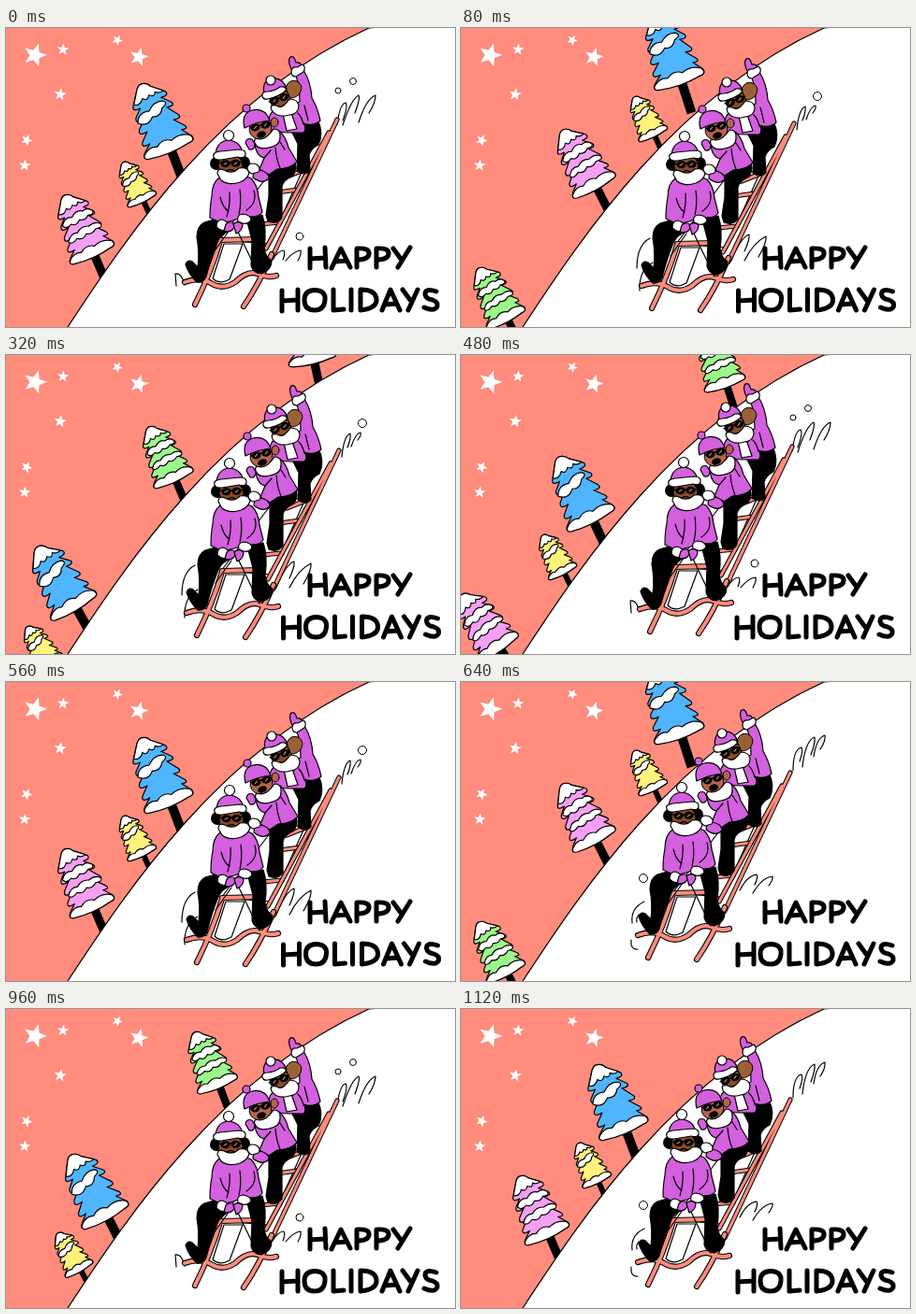
These frames come from a looping animation (480 by 320 pixels, 1.2 s). An HTML page with a canvas:

```html
<!DOCTYPE html>
<html lang="en">
<head>
<meta charset="utf-8">
<title>Happy Holidays</title>
<style>
html, body { margin: 0; width: 100%; height: 100%; overflow: hidden; background: #ff8c7d; }
canvas { display: block; width: 480px; height: 320px; }
</style>
</head>
<body>
<canvas id="stage" width="480" height="320" role="img" aria-label="Happy Holidays"></canvas>
<script>
const ctx = document.getElementById('stage').getContext('2d');
const STEP = 80, STEPS = 15;
const SKY = '#ff8c7d', PURPLE = '#d360de', WHITE = '#fff', INK = '#000';
const SKIN = '#8c4a26', TAN = '#b5644c', HAIR = '#9c6036';

function shape(d, fill, line = 1.2) {
  const p = new Path2D(d);
  if (fill) { ctx.fillStyle = fill; ctx.fill(p); }
  if (line) { ctx.strokeStyle = INK; ctx.lineWidth = line; ctx.stroke(p); }
}

function oval(x, y, rx, ry, fill, rot = 0, line = 1.2) {
  ctx.beginPath();
  ctx.ellipse(x, y, rx, ry, rot, 0, Math.PI * 2);
  if (fill) { ctx.fillStyle = fill; ctx.fill(); }
  if (line) { ctx.strokeStyle = INK; ctx.lineWidth = line; ctx.stroke(); }
}

function tubes(d, width) {
  const p = new Path2D(d);
  ctx.strokeStyle = INK; ctx.lineWidth = width + 2.2; ctx.stroke(p);
  ctx.strokeStyle = SKY; ctx.lineWidth = width; ctx.stroke(p);
}

function shifted([x, y], draw) {
  ctx.save();
  ctx.translate(x, y);
  draw();
  ctx.restore();
}

// x, y, radius, turn
const stars = [
  [31, 29, 13, .3], [61, 23, 6.5, .1], [119, 13, 6, .5], [142, 31, 10.5, .25],
  [58, 71, 7, .15], [22, 120, 6.5, .45], [20, 147, 6.5, .1]
];

function drawStar([x, y, r, turn]) {
  ctx.beginPath();
  for (let i = 0; i < 10; i++) {
    const a = turn + i * Math.PI / 5 - Math.PI / 2, k = i % 2 ? r * .42 : r;
    ctx.lineTo(x + k * Math.cos(a), y + k * Math.sin(a));
  }
  ctx.fillStyle = WHITE;
  ctx.fill();
}

const twoBands = 'M-19 32Q-13 23 -5 27Q3 20 9 25Q16 23 20 29Q21 34 13 32Q8 37 2 33Q-4 39 -9 34Q-16 38 -19 32Z'
  + 'M-20 52Q-14 43 -6 46Q1 40 9 44Q18 41 23 47Q24 52 15 50Q9 55 3 51Q-3 57 -9 52Q-17 57 -20 52Z';
const swoosh = 'M-21 38Q-17 27 -5 30Q3 22 12 25Q18 29 9 32Q4 41 -4 37Q-12 46 -21 38Z';

// stops: step in the seven-step run -> treetop x, y and tilt in degrees
const trees = [
  { color: '#f59ff2', size: .92, snow: twoBands, stops: {
    6: [3, 255, 32], 0: [65, 178, 23], 1: [111, 108, 27], 2: [173, 45, 19], 3: [241, -16, 16], 4: [313, -62, 12] } },
  { color: '#4fb5ff', size: 1, snow: swoosh, stops: {
    4: [36, 204, 29], 5: [72, 155, 27], 6: [107, 108, 25], 0: [147, 59, 21], 1: [210, -15, 18], 2: [295, -65, 10] } },
  { color: '#fff27c', size: .6, snow: swoosh, stops: {
    4: [24, 290, 29], 5: [57, 239, 28], 6: [89, 192, 26], 0: [127, 143, 24], 1: [187, 73, 24], 2: [260, 17, 16] } },
  { color: '#9cf78a', size: .82, snow: twoBands, stops: {
    1: [21, 256, 26], 2: [62, 181, 25], 3: [107, 131, 25], 4: [155, 76, 23], 5: [204, 24, 21], 6: [263, -27, 18] } }
];

function drawTree(tree, phase) {
  const stop = tree.stops[phase];
  if (!stop) return;
  const [x, y, tilt] = stop, line = 1.2 / tree.size;
  ctx.save();
  ctx.translate(x, y);
  ctx.rotate(-tilt * Math.PI / 180);
  ctx.scale(tree.size, tree.size);
  ctx.fillStyle = INK;
  ctx.fillRect(-3, 68, 10, 44);
  shape('M-3 0Q3 0 6 6L19 17Q21 22 12 21L21 30Q23 35 14 33L23 45Q25 50 16 48L25 58Q28 63 20 61L28 71Q30 77 22 77Q0 82 -24 77Q-31 76 -25 70L-17 63Q-27 65 -24 59L-15 50Q-26 52 -22 45L-13 36Q-24 39 -21 32L-13 24Q-23 25 -19 19L-9 4Q-6 0 -3 0Z', tree.color, line);
  shape('M-3 0Q3 0 6 6L17 15Q12 17 8 13Q6 19 1 14Q-3 20 -7 15Q-12 22 -18 18L-9 4Q-6 0 -3 0Z', WHITE, line);
  shape(tree.snow, WHITE, line);
  shape('M-27 73Q-19 65 -11 69Q-2 62 6 68Q17 63 27 70Q31 77 22 77Q0 82 -24 78Q-29 77 -27 73Z', WHITE, line);
  ctx.restore();
}

function drawHill() {
  shape('M66 320C130 222 230 72 388 0L490 -10L490 330L60 330Z', WHITE);
}

function drawSled() {
  shape('M228 227L286 150L318 150L282 231Z', WHITE);
  tubes('M318 152L298 160M312 173L290 176M293 208L272 210', 3);
  tubes('M345 112L278 236M354 98L284 246', 3);
  tubes('M229 227L268 226M229 228Q219 262 202 296M284 242Q270 275 254 298'
    + 'M191 272Q207 266 219 273Q231 281 245 272Q258 259 269 263Q279 268 289 265', 4);
  shape('M233 231L253 231L239 269Q228 275 221 268Z', WHITE);
  shape('M246 214L269 262M239 216L222 240', null);
}

function glasses(x, y, tilt) {
  ctx.save();
  ctx.translate(x, y);
  ctx.rotate(tilt);
  oval(-5.5, 0, 5, 4, INK, 0, 0);
  oval(5.5, 0, 5, 4, INK, 0, 0);
  shape('M-11 -1L11 -1', null, 1.6);
  ctx.strokeStyle = '#d9a68c';
  ctx.lineWidth = 1;
  ctx.stroke(new Path2D('M-7 1L-4 -1M4 1L7 -1'));
  ctx.restore();
}

function drawRear() {
  shape('M304 108L333 98Q340 112 334 125Q326 129 324 136L325 153Q319 159 311 153L312 124Z', INK);
  shape('M314 79Q314 60 309 49L318 45Q326 58 327 75Q333 85 336 99Q328 106 318 102Q322 108 318 112L304 112Q289 112 282 108Q278 96 286 88Z', PURPLE);
  shape('M296 92L300 110L311 108L305 91Z', WHITE);
  shape('M319 83L323 99M318 103Q316 95 312 91', null);
  oval(293, 76, 11, 11, SKIN, -.2, 1);
  shape('M299 63Q303 54 311 57Q318 61 315 68Q312 75 304 75Z', HAIR, 1);
  shape('M284 88Q281 81 289 83Q296 87 303 76Q312 76 313 83Q313 92 303 93Q290 97 284 88Z', WHITE);
  glasses(292, 76, -.35);
  shape('M291 84Q295 86 298 82', null, 1);
  shape('M276 70Q273 56 285 54Q296 53 300 65L279 75Z', PURPLE);
  oval(283, 56, 5, 5, WHITE);
  shape('M274 73Q273 68 280 68Q288 67 293 63Q300 62 299 67Q293 73 280 76Q275 77 274 73Z', WHITE);
  shape('M304 42Q301 34 304 31Q308 29 310 37Q316 36 316 43L308 49Z', PURPLE);
  shape('M305 47Q305 41 311 42L317 39Q321 42 318 47L310 52Q305 52 305 47Z', WHITE);
}

function drawMiddle() {
  shape('M281 151L308 140Q312 149 307 158Q296 163 295 170L295 203Q290 211 280 207L278 200L281 180Z', INK);
  shape('M266 123Q277 111 292 110Q299 116 302 128L311 143Q304 151 290 151L281 157L271 151L276 139Q267 137 266 123Z', PURPLE);
  shape('M276 139L283 131M291 119L298 130M288 128Q289 141 293 150', null);
  oval(287, 101, 4, 5, TAN, 0, 1);
  oval(272, 108, 12, 11, TAN, -.2, 1);
  shape('M266 123Q264 117 271 119Q279 119 286 108Q294 108 293 117Q293 126 281 128Q269 131 266 123Z', WHITE);
  glasses(272, 105, -.25);
  oval(273, 114, 5, 3.5, INK, -.3, 0);
  shape('M255 107Q251 92 263 88Q277 85 282 99Q269 100 255 107Z', PURPLE);
  oval(257, 86, 4, 4, PURPLE);
  shape('M256 123Q257 117 263 119L266 124Q266 131 260 130Z', PURPLE);
}

function drawFront() {
  shape('M212 208Q228 202 239 208L240 217Q230 220 226 229Q219 246 214 266Q211 273 204 272Q195 263 192 253Q194 247 199 250L205 256Q207 240 204 224Q204 212 212 208Z', INK);
  shape('M257 204L274 200Q279 215 276 235Q277 245 284 249Q284 259 273 263Q264 262 262 254L263 227Z', INK);
  shape('M228 160Q244 152 262 161Q269 168 270 181L274 197Q269 204 257 201L243 206L231 209L218 203Q218 190 220 180Q220 166 228 160Z', PURPLE);
  shape('M239 176Q240 188 236 202M250 173Q252 187 249 199', null);
  shape('M229 181Q232 193 238 196M265 174Q269 187 257 195', null);
  oval(225, 145, 7, 7, INK, 0, 0);
  oval(254, 144, 7, 7, INK, 0, 0);
  oval(240, 147, 13, 12, SKIN, 0, 1);
  shape('M226 156Q226 149 233 152Q242 157 249 150Q258 148 260 155Q258 162 250 165Q238 169 230 163Z', WHITE);
  glasses(240, 145, -.03);
  shape('M236 153Q240 150 244 153', null, 1.4);
  shape('M224 134Q226 121 238 120Q250 121 253 133Z', PURPLE);
  oval(238, 115, 5.5, 5.5, WHITE);
  shape('M222 138Q220 133 229 132L249 130Q257 130 256 136Q255 140 248 138L230 141Q223 142 222 138Z', WHITE);
  shape('M225 213Q225 205 231 205Q239 207 237 215Q230 219 225 213Z', WHITE);
  shape('M248 207Q246 200 253 199Q262 200 262 206Q257 212 248 207Z', WHITE);
  shape('M235 210Q241 205 245 211Q242 220 233 217Z', PURPLE);
  shape('M243 210Q248 205 253 210Q253 217 246 220Z', PURPLE);
  // the second rider's mitten
  shape('M264 160Q264 153 271 152Q281 154 281 161Q274 168 264 160Z', PURPLE);
  shape('M258 149Q260 143 268 146Q273 150 270 154L263 156Q258 154 258 149Z', WHITE);
}

const poses = [
  {
    sled: [0, 0], rear: [0, 0], middle: [0, 0], front: [0, 0], text: [0, 0],
    spray: 'M354 103Q357 81 363 80Q366 83 360 99M360 104Q369 76 377 72Q379 75 373 91M377 101Q385 76 395 72Q395 80 388 91M285 248Q291 238 297 238Q299 241 296 248M299 249Q307 239 315 238Q316 242 312 249M182 276L181 263Q188 262 191 275',
    drops: [[355, 67, 3], [371, 57, 3.5], [314, 223, 4]]
  },
  {
    sled: [2, 4], rear: [1, 2], middle: [1, 1], front: [1, 1], text: [1.5, 0],
    spray: 'M359 109Q361 87 368 84Q369 89 365 99M369 98Q374 83 379 83Q380 86 376 91M188 257Q188 232 202 225M191 281Q190 259 205 251M289 249Q299 224 308 221Q309 226 303 239M303 249Q313 229 326 223Q327 230 318 245',
    drops: [[381, 73, 4.5]]
  },
  {
    sled: [-2, -1], rear: [-4, -1], middle: [-3, -1], front: [-2, -2], text: [1, 0],
    spray: 'M355 95Q355 72 364 70Q366 74 362 85M365 91Q368 63 378 59Q379 65 374 78M377 80Q380 60 389 57Q390 63 384 72M183 258Q181 242 196 235M182 276Q181 287 189 286M190 249Q187 253 188 257M298 223Q306 207 316 206Q318 209 314 217M312 226Q322 209 333 208Q334 211 329 218',
    drops: [[195, 210, 4.5]]
  }
];

const happy = 'M325 236L325 257M341 235L342 256M325 247L341 246M348 257L358 236L368 256M352 250L364 249M375 256L375 236Q389 235 388 242Q387 248 375 248M396 256L396 236Q410 235 409 242Q408 248 396 248M414 236L422 247M432 235L419 256';
const holidays = 'M295 281L295 303M312 280L312 302M295 292L312 291M330 280.5Q342 281 341 291Q340 302 330 302Q319 302 319 291Q319 281 330 280.5ZM350 280L350 302L361 301M369 280L369 302M379 280L379 302Q397 300 396 290Q395 280 379 280M402 302L411 280L421 302M405 296L417 295M424 280L432 291M440 280L430 302M460 282Q448 278 448 285Q449 290 456 291Q462 293 461 298Q458 304 447 299';

function draw(step) {
  const pose = poses[step % 3];
  ctx.fillStyle = SKY;
  ctx.fillRect(0, 0, 480, 320);
  stars.forEach(drawStar);
  trees.forEach(tree => drawTree(tree, step % 7));
  drawHill();
  shape(pose.spray, null);
  pose.drops.forEach(([x, y, r]) => oval(x, y, r, r, WHITE, 0, 1));
  shifted(pose.sled, drawSled);
  shifted(pose.rear, drawRear);
  shifted(pose.middle, drawMiddle);
  shifted(pose.front, drawFront);
  shape(happy, null, 5);
  shifted(pose.text, () => shape(holidays, null, 5));
}

ctx.lineCap = ctx.lineJoin = 'round';
const start = performance.now();
let last = -1;

function tick() {
  const step = Math.floor((performance.now() - start) / STEP) % STEPS;
  if (step !== last) draw(last = step);
  requestAnimationFrame(tick);
}
tick();
</script>
</body>
</html>
```
